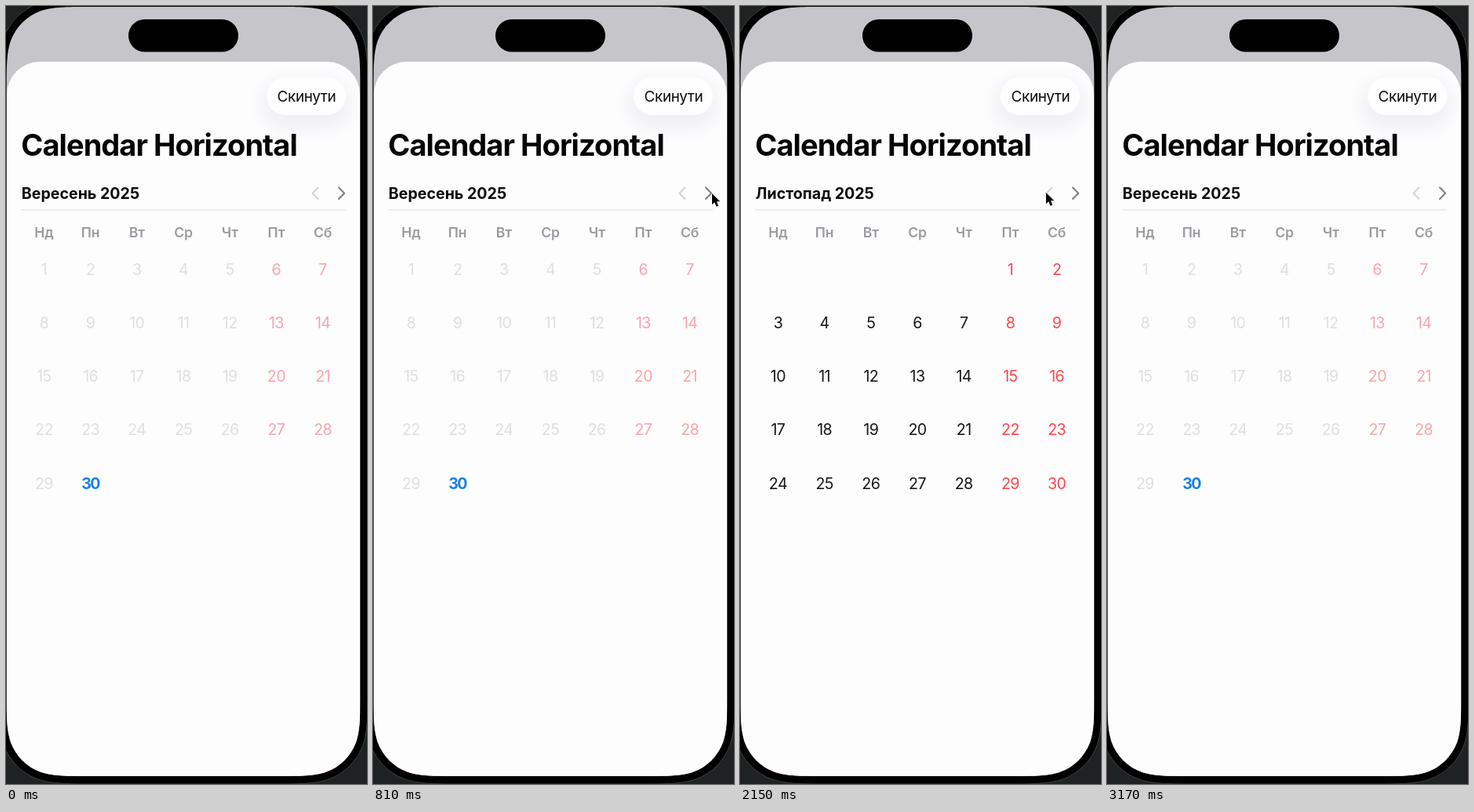
These frames come from a looping animation (460x992 px, 3.19 s). An HTML page:

```html
<!DOCTYPE html>
<html lang="uk">
<head>
<meta charset="utf-8">
<title>Calendar Horizontal</title>
<style>
  html, body { margin: 0; width: 100%; height: 100%; overflow: hidden; background: #1f2223; }
  svg { display: block; width: 460px; height: 992px; }
  text { font-family: Inter, "Liberation Sans", sans-serif; fill: #0c0c0d; }
  .title { font-size: 38px; font-weight: 700; letter-spacing: -.94px; fill: #050506; }
  .month { font-size: 19.6px; font-weight: 700; }
  .reset { font-size: 19px; letter-spacing: -.4px; text-anchor: middle; }
  .weekday { font-size: 17.6px; font-weight: 600; letter-spacing: -.2px; text-anchor: middle; fill: #9b9b9f; }
  .day { font-size: 19.6px; letter-spacing: -.6px; text-anchor: middle; fill: #161617; }
  .weekend { fill: #f9474c; }
  .past { fill: #dfdfe2; }
  .past.weekend { fill: #f6a5aa; }
  .today { font-weight: 700; letter-spacing: -1.6px; fill: #1a80e6; }
  .chevron { fill: none; stroke: #7d7d82; stroke-width: 2; stroke-linecap: round; stroke-linejoin: round; }
</style>
</head>
<body>
<svg viewBox="0 0 460 992">
  <defs>
    <clipPath id="screen"><path id="glass"/></clipPath>
    <filter id="soft" x="-50%" y="-100%" width="200%" height="300%"><feGaussianBlur stdDeviation="13"/></filter>
  </defs>

  <rect width="460" height="992" fill="#1f2223"/>
  <path id="bezel" fill="#000" stroke="#3d4041"/>
  <g clip-path="url(#screen)">
    <rect width="460" height="992" fill="#c6c5ca"/>
    <rect x="1" y="71" width="450" height="960" rx="42" fill="#fdfdfe"/>
    <rect x="328" y="98" width="108" height="54" rx="27" fill="#e6e6ee" opacity=".75" filter="url(#soft)"/>
    <rect x="332" y="91" width="101" height="48" rx="24" fill="#fefeff"/>
    <text class="reset" x="383" y="121.6">Скинути</text>
    <text class="title" x="19.3" y="190.5">Calendar Horizontal</text>
    <text class="month" id="month" x="19.8" y="245.5"></text>
    <path class="chevron" id="prev" d="M397.5 231.5 390.5 238.7 397.5 246"/>
    <path class="chevron" id="next" d="M424 231.5 431.2 238.7 424 246"/>
    <rect x="19" y="259.3" width="414" height="1.3" fill="#e4e4e8"/>
    <g id="weekdays"></g>
    <g id="pages"></g>
  </g>
  <rect x="156" y="17" width="140" height="41.5" rx="20.7" fill="#000"/>
  <path id="cursor" d="M0 0V14.2L3.3 11.2 5.6 16.8 8.2 15.7 5.9 10.3H10.2Z"
        fill="#000" stroke="#fff" stroke-width="1" paint-order="stroke"/>
</svg>
<script>
const LOOP = 3190, PAGE = 450;
const $ = id => document.getElementById(id);

const months = [
  { name: 'Вересень 2025', first: 0, days: 30, today: 30 },
  { name: 'Жовтень 2025', first: 2, days: 31, today: 0 },
  { name: 'Листопад 2025', first: 5, days: 30, today: 0 }
];

// [time, page]
const scroll = [[0, 0], [900, 0], [1080, 1], [1370, 1], [1540, 2], [2170, 2], [2240, 1], [2380, 1], [2500, 0], [LOOP, 0]];
// [time, x, y]
const pointer = [[90, 262, 994], [250, 311, 494], [400, 352, 392], [620, 432, 239], [1130, 432, 239],
  [1240, 431, 236], [1640, 431, 236], [1940, 390, 238], [2620, 390, 238], [2900, 470, 330]];
const pressNext = [[860, 950], [1270, 1400]];
const pressPrev = [[2140, 2220], [2370, 2450]];

// Rounded box whose corners ease into the sides
function smoothBox(x, y, w, h, r) {
  const corner = [[0, 1.529], [0, 1.0885], [0, .868], [.075, .6315], [.169, .373], [.373, .169],
    [.6315, .075], [.868, 0], [1.0885, 0], [1.529, 0]];
  const curve = (right, bottom, flip) => {
    const pts = (flip ? [...corner].reverse() : corner).map(([a, b]) =>
      `${right ? x + w - a * r : x + a * r} ${bottom ? y + h - b * r : y + b * r}`);
    return `${pts[0]}C${pts.slice(1).join(' ')}`;
  };
  return `M${curve(0, 0, 0)}L${curve(1, 0, 1)}L${curve(1, 1, 0)}L${curve(0, 1, 1)}Z`;
}

$('glass').setAttribute('d', smoothBox(.7, 1, 450.6, 981, 69));
$('bezel').setAttribute('d', smoothBox(-9, -9, 470, 1001, 79));

function addText(parent, cls, x, y, str) {
  const t = document.createElementNS('http://www.w3.org/2000/svg', 'text');
  t.setAttribute('class', cls);
  t.setAttribute('x', x);
  t.setAttribute('y', y);
  t.textContent = str;
  parent.append(t);
}

const column = i => 48.4 + 59.2 * i;

['Нд', 'Пн', 'Вт', 'Ср', 'Чт', 'Пт', 'Сб'].forEach((d, i) => addText($('weekdays'), 'weekday', column(i), 295.3, d));

months.forEach((m, page) => {
  for (let d = 1; d <= m.days; d++) {
    const cell = m.first + d - 1, col = cell % 7, row = Math.floor(cell / 7);
    let cls = 'day';
    if (col > 4) cls += ' weekend';
    if (d < m.today) cls += ' past';
    if (d === m.today) cls += ' today';
    addText($('pages'), cls, column(col) + page * PAGE, 342.8 + 68.2 * row, d);
  }
});

const ease = u => u * u * (3 - 2 * u);

// Eased values from a table of [time, ...values]
function at(table, t) {
  const i = table.findIndex(k => k[0] > t);
  if (i < 1) return table[i < 0 ? table.length - 1 : 0].slice(1);
  const a = table[i - 1], b = table[i];
  const u = ease((t - a[0]) / (b[0] - a[0]));
  return a.slice(1).map((v, n) => v + (b[n + 1] - v) * u);
}

const pressed = (spans, t) => spans.some(([a, b]) => t >= a && t < b);

function draw(t) {
  const [pos] = at(scroll, t);
  const page = Math.round(pos);
  $('pages').setAttribute('transform', `translate(${-pos * PAGE} 0)`);
  $('month').textContent = months[page].name;
  $('prev').style.opacity = page === 0 || pressed(pressPrev, t) ? .32 : 1;
  $('next').style.opacity = pressed(pressNext, t) ? .25 : 1;

  const [x, y] = at(pointer, t);
  $('cursor').setAttribute('transform', `translate(${x} ${y})`);
  $('cursor').style.display = t >= 90 && t < 2900 ? '' : 'none';
}

const start = performance.now();
function tick() {
  draw((performance.now() - start) % LOOP);
  requestAnimationFrame(tick);
}
tick();
</script>
</body>
</html>
```
